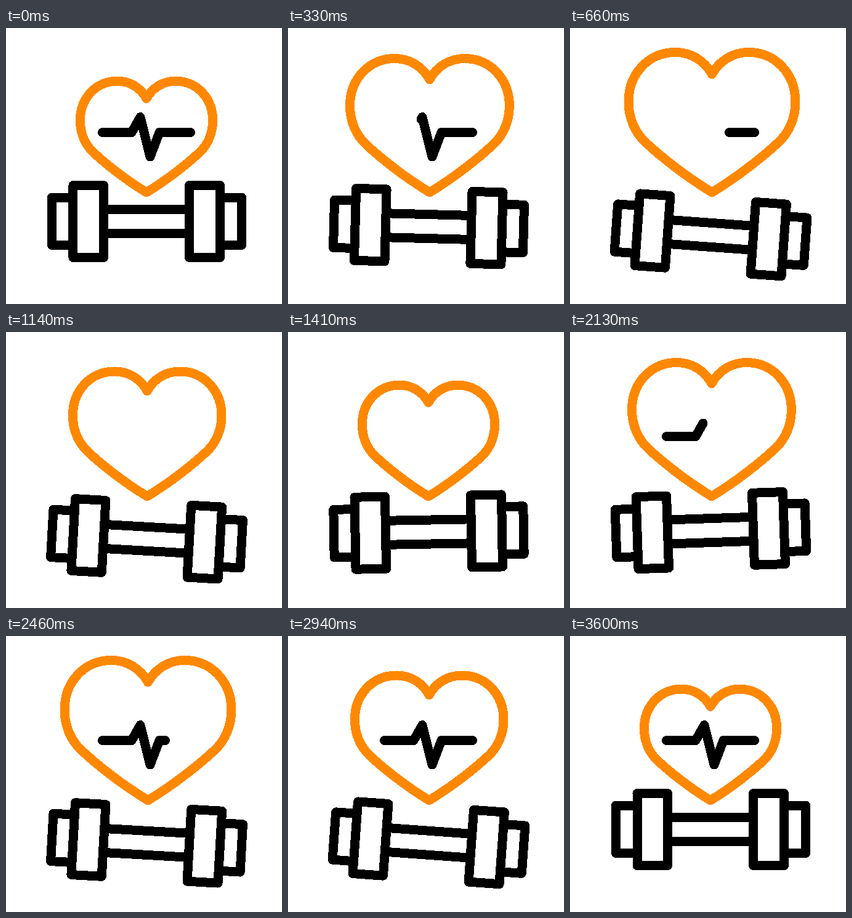
Write an HTML page that moves like this. It is 448x448 px and loops after 3.63 s.

```html
<!DOCTYPE html>
<html lang="en">
<head>
<meta charset="utf-8">
<title>Heart and dumbbell</title>
<style>
  html, body { margin: 0; width: 100%; height: 100%; overflow: hidden; background: #fff; }
  svg { display: block; width: 100vw; height: 100vh; }
  path {
    fill: none; stroke: #000; stroke-width: 15;
    stroke-linecap: round; stroke-linejoin: round; shape-rendering: crispEdges;
  }
  #heart { stroke: #ff8800; vector-effect: non-scaling-stroke; }
</style>
</head>
<body>
<svg viewBox="0 0 448 448">
  <path id="heart" d="M228 114.5
    C218.5 97 201 86.2 181 86.2 C146 86.2 120.4 114 120.4 150
    C120.4 170 128 189 142 202 C161 220 195 247 228 266.8
    C261 247 295 220 314 202 C328 189 335.6 170 335.6 150
    C335.6 114 310 86.2 275 86.2 C255 86.2 237.5 97 228 114.5Z"/>
  <path id="pulse" pathLength="100" d="M156.5 169.5H204L218 144.5L234 209L249 169.5H299.5"/>
  <path id="dumbbell" d="M109 255.5H158.5V372.5H109Z M297.5 255.5H347.5V372.5H297.5Z
    M109 275H74.5V352.5H109 M347.5 275H382.5V352.5H347.5
    M158.5 294.5H297.5 M158.5 333.5H297.5"/>
</svg>
<script>
  const LOOP = 3630;

  // Each track lists [time in ms, value]; values are eased between the steps.
  const tracks = {
    tilt: [[0, 0], [900, 5], [1800, -5], [2700, 5], [3600, 0]],
    drop: [[0, 0], [900, 26.5], [1800, 0], [2700, 26.5], [3600, 0]],
    beat: [[0, 1], [450, 1.245], [900, 1.275], [1350, 1], [1800, 1]],
    erase: [[0, 0], [900, 100]],
    draw: [[1800, 0], [2700, 100]]
  };

  const heart = document.getElementById('heart');
  const pulse = document.getElementById('pulse');
  const dumbbell = document.getElementById('dumbbell');

  const smooth = x => x * x * (3 - 2 * x);

  function valueAt(track, t) {
    if (t <= track[0][0]) return track[0][1];
    for (let i = 1; i < track.length; i++) {
      const [t0, a] = track[i - 1];
      const [t1, b] = track[i];
      if (t < t1) return a + (b - a) * smooth((t - t0) / (t1 - t0));
    }
    return track[track.length - 1][1];
  }

  function trim(path, from, to) {
    const length = to - from;
    path.style.visibility = length > 0.01 ? 'visible' : 'hidden';
    path.setAttribute('stroke-dasharray', `${length} 1000`);
    path.setAttribute('stroke-dashoffset', -from);
  }

  function render(t) {
    const scale = valueAt(tracks.beat, t < 3600 ? t % 1800 : 0);
    heart.setAttribute('transform', `translate(218.5 267) scale(${scale}) translate(-218.5 -267)`);

    const tilt = valueAt(tracks.tilt, t);
    const drop = valueAt(tracks.drop, t);
    dumbbell.setAttribute('transform', `translate(0 ${drop}) rotate(${tilt} 228.5 314)`);

    if (t < 1800) trim(pulse, valueAt(tracks.erase, t), 100);
    else trim(pulse, 0, valueAt(tracks.draw, t));
  }

  const start = performance.now();
  function tick(now) {
    render(Math.max(0, now - start) % LOOP);
    requestAnimationFrame(tick);
  }
  render(0);
  requestAnimationFrame(tick);
</script>
</body>
</html>
```
